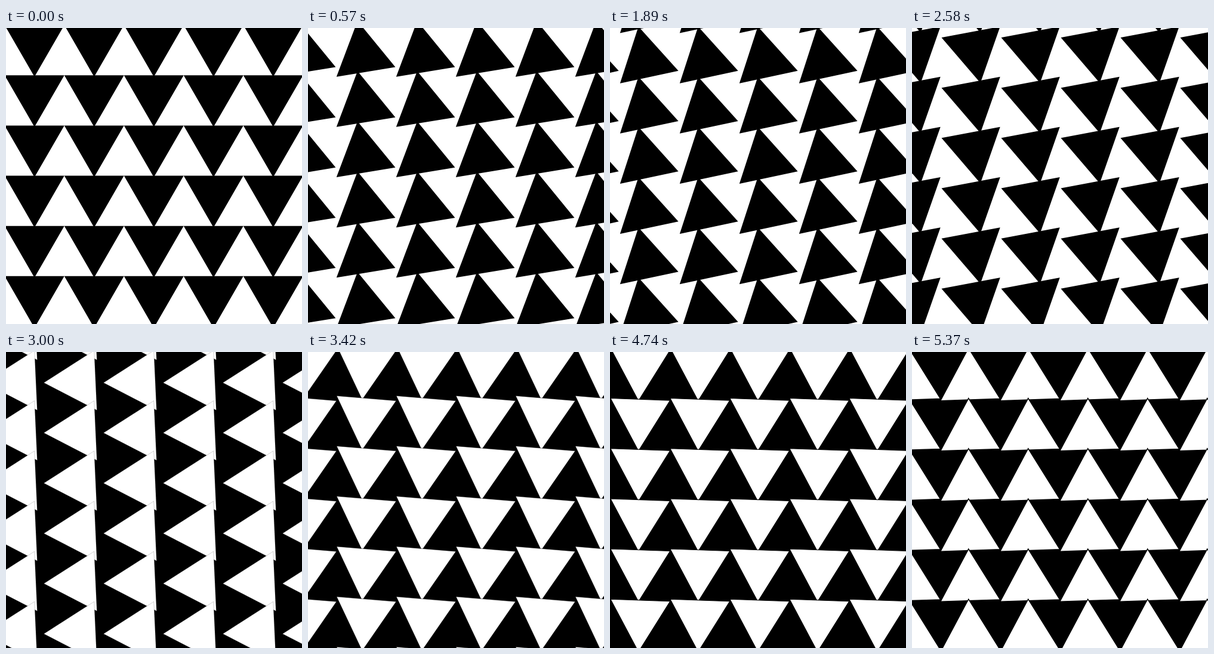
Animation of 496 by 496 pixels, one loop 5.4 s. Source, as an HTML page without scripts:

```html
<!DOCTYPE html>
<html lang="en">
<head>
<meta charset="utf-8">
<title>Turning triangles</title>
<style>
  @property --turn { syntax: "<angle>"; inherits: true; initial-value: -90deg; }
  @property --shift { syntax: "<angle>"; inherits: true; initial-value: 0deg; }
  @property --edge { syntax: "<length>"; inherits: true; initial-value: 0px; }

  html, body { margin: 0; width: 100%; height: 100%; overflow: hidden; }

  svg {
    display: block;
    width: 100%;
    height: 100%;
    color: #000;
    background: #fff;
    animation:
      turn 5.4s steps(180) infinite,
      swap 5.4s step-end infinite,
      edge 5.4s linear infinite;
  }

  /* each triangle pivots on one corner */
  .tri {
    fill: currentColor;
    stroke: #000;
    stroke-width: var(--edge);
    transform-origin: 0 0;
    transform: rotate(calc(var(--turn) + var(--shift)));
  }

  @keyframes turn {
    from { --turn: -90deg; }
    to { --turn: 390deg; }
  }

  /* figure and ground trade places when the gaps become triangles */
  @keyframes swap {
    0% { color: #000; background-color: #fff; --shift: 0deg; }
    50%, 100% { color: #fff; background-color: #000; --shift: -59.3deg; }
  }

  /* white triangles slowly gain a dark outline */
  @keyframes edge {
    0%, 50% { --edge: 0px; }
    100% { --edge: 1.5px; }
  }
</style>
</head>
<body>
<svg viewBox="0 0 496 496" xmlns="http://www.w3.org/2000/svg">
  <defs>
    <path id="tri" class="tri" d="M0 0L86.6 -50V50Z"/>
    <g id="row">
      <use href="#tri" x="-300"/>
      <use href="#tri" x="-200"/>
      <use href="#tri" x="-100"/>
      <use href="#tri"/>
      <use href="#tri" x="100"/>
      <use href="#tri" x="200"/>
      <use href="#tri" x="300"/>
    </g>
  </defs>
  <g transform="translate(247.7 250)">
    <use href="#row" y="-336.6"/>
    <use href="#row" y="-252.45"/>
    <use href="#row" y="-168.3"/>
    <use href="#row" y="-84.15"/>
    <use href="#row"/>
    <use href="#row" y="84.15"/>
    <use href="#row" y="168.3"/>
    <use href="#row" y="252.45"/>
    <use href="#row" y="336.6"/>
  </g>
</svg>
</body>
</html>
```
